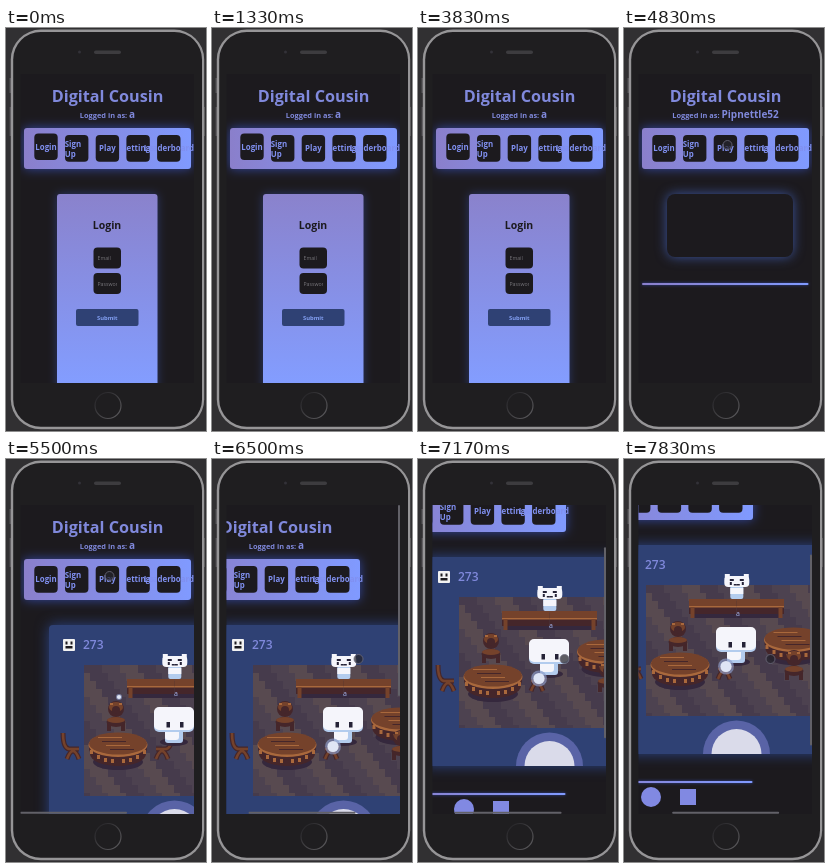
An HTML page with a canvas that plays this animation: 200x403 px, repeating every 8 s.

```html
<!DOCTYPE html>
<html lang="en">
<head>
<meta charset="utf-8">
<title>Phone demo</title>
<style>
html, body { margin: 0; width: 100%; height: 100%; overflow: hidden; background: #313032; }
canvas { display: block; width: 200px; height: 403px; }
</style>
</head>
<body>
<canvas id="stage" width="200" height="403"></canvas>
<script>
const c = document.getElementById('stage').getContext('2d');
const LOOP = 8000;
const FONT = '"Open Sans", "Noto Sans", sans-serif';
const DARK = '#1c1a1e', NAVY = '#2f4174', PURPLE = '#8a7fcb', BLUE = '#809aff', TEXT = '#8089dc';
const WOOD = '#75422b', WOOD_DARK = '#45262a', WOOD_LIGHT = '#a9683c';
const WHITE = '#f5f5fb', SHADE = '#b3ccee', INK = '#252237', SHADOW = '#35283d';

function box(x, y, w, h, r, fill, glow = 0, glowColor = '#3347a0') {
  c.save();
  c.shadowBlur = glow;
  c.shadowColor = glowColor;
  c.fillStyle = fill;
  c.beginPath();
  c.roundRect(x, y, w, h, r);
  c.fill();
  c.restore();
}

function disc(x, y, rx, fill, ry = rx) {
  c.fillStyle = fill;
  c.beginPath();
  c.ellipse(x, y, rx, ry, 0, 0, 7);
  c.fill();
}

function text(s, x, y, size, fill = TEXT, align = 'center', weight = 700) {
  c.font = `${weight} ${size}px ${FONT}`;
  c.textAlign = align;
  c.fillStyle = fill;
  c.fillText(s, x, y);
}

function blend(x0, y0, x1, y1, from = PURPLE, to = BLUE) {
  const g = c.createLinearGradient(x0, y0, x1, y1);
  g.addColorStop(0, from);
  g.addColorStop(1, to);
  return g;
}

// A block and its mirror image, both dx away from the axis
function pair(dx, y, w, h, fill) {
  c.fillStyle = fill;
  c.fillRect(dx, y, w, h);
  c.fillRect(-dx - w, y, w, h);
}

function at(x, y, paint, flip = 1) {
  c.save();
  c.translate(x, y);
  c.scale(flip, 1);
  paint();
  c.restore();
}

function clipped(x, y, w, h, paint) {
  c.save();
  c.beginPath();
  c.rect(x, y, w, h);
  c.clip();
  paint();
  c.restore();
}

// Eased progress between two times
function ease(t, a, b) {
  const p = Math.min(1, Math.max(0, (t - a) / (b - a)));
  return p * p * (3 - 2 * p);
}

function phone() {
  c.fillStyle = '#313032';
  c.fillRect(0, 0, 200, 403);
  box(3.5, 50, 2, 15, 0, '#555456');
  at(101.3, 0, () => pair(95.7, 79, 2, 29, '#555456'));
  box(4.8, 1.6, 193.4, 399.6, 30, '#969597');
  box(7.2, 4, 188.8, 394.8, 27.6, '#1f1e20');
  box(88, 22.5, 27, 3.5, 2, '#3d3c3f');
  disc(73.5, 24, 1.5, '#333238');
  c.strokeStyle = blend(90, 366, 113, 390, '#242326', '#5c5b5e');
  c.lineWidth = 1.2;
  c.beginPath();
  c.arc(102, 377.5, 13, 0, 7);
  c.stroke();
}

function header(t, user) {
  text('Digital Cousin', 101.5, 74, 16.2);
  c.font = `700 7.4px ${FONT}`;
  const label = 'Logged in as: ', w = c.measureText(label).width;
  c.font = `700 10px ${FONT}`;
  const left = 101.5 - (w + c.measureText(user).width) / 2;
  text(label, left, 90, 7.4, TEXT, 'left');
  text(user, left + w, 90, 10, TEXT, 'left');

  box(18, 100, 167, 41, 3, blend(18, 0, 185, 0), 11);
  const lift = 1.6 * (1 - ease(t, 4330, 4670));
  const labels = ['Login', 'Sign Up', 'Play', 'Settings', 'Leaderboard'];
  labels.forEach((s, i) => box(28.3 + i * 30.7, 107 - (i ? 0 : lift), 23.4, 26.7, 4, DARK));
  labels.forEach((s, i) => {
    const x = 40 + i * 30.7, y = 123.2 - (i ? 0 : lift / 2);
    const words = s.split(' ');
    if (words.length == 1) text(s, x, y, 7.9, '#8090f0');
    else words.forEach((word, k) => text(word, x - 12, y - 4.5 + k * 10, 7.9, '#8090f0', 'left'));
  });
}

function loginForm() {
  box(51, 166, 100.5, 220, 3, blend(0, 166, 0, 355, '#8a82cc', '#839dff'), 10, '#2b3768');
  text('Login', 101, 200.5, 10.5, DARK);
  ['Email', 'Password'].forEach((s, i) => {
    const y = 219.5 + i * 25.5;
    box(87.5, y, 27.5, 21, 4, DARK);
    clipped(91, y, 20, 21, () => text(s, 91.5, y + 12.5, 5.2, '#77757a', 'left', 400));
  });
  box(70, 281, 62.5, 17, 2, NAVY);
  text('Submit', 101.3, 291.7, 5.8, '#84a0f4');
}

function rule(y) {
  box(18, y - 1, 166.5, 2, 1, blend(18, 0, 184, 0), 3);
}

function loadingPanel() {
  box(43, 166, 126, 63, 8, DARK, 12, '#3c549c');
  rule(256);
}

// Staggered planks stepping down to the right
function floor() {
  const tones = ['#463b4c', '#4d4250', '#584a50'];
  for (let row = 0; row < 17; row++)
    for (let col = -6; col < 11; col++) {
      c.fillStyle = tones[(col + 6) % 3];
      c.fillRect(78 + col * 18 + row * 6, 206 + row * 8, 18, 8);
    }
}

function roundTable() {
  disc(0, 31, 25, SHADOW, 8);
  disc(0, 23, 28, WOOD_DARK, 12);
  disc(0, 18, 29, WOOD_DARK, 12);
  disc(0, 14, 29.5, WOOD_LIGHT, 12);
  disc(0, 12.5, 29, WOOD, 11);
  for (let i = 0; i < 4; i++) {
    pair(4 + i * 7, 28 - i * i, 3, 4, WOOD_LIGHT);
    box(-20 + i * 4, 6 + i * 4, 24, 1, 0, i % 2 ? WOOD_DARK : WOOD_LIGHT);
  }
}

function sideChair() {
  c.lineJoin = 'round';
  for (const [width, tone] of [[5, WOOD_DARK], [2.5, WOOD]]) {
    c.strokeStyle = tone;
    c.lineWidth = width;
    c.beginPath();
    c.moveTo(2, 2);
    c.quadraticCurveTo(2, 17, 8, 18);
    c.lineTo(18, 18);
    c.moveTo(6, 28);
    c.quadraticCurveTo(12, 12, 18, 28);
    c.stroke();
  }
}

function frontChair() {
  pair(5, 20, 4, 9, WOOD_DARK);
  disc(0, 7, 8, WOOD_DARK);
  disc(0, 5, 7, WOOD, 5);
  disc(0, 8, 4, WOOD_DARK);
  disc(0, 20, 9.5, WOOD_DARK, 5);
  disc(0, 18, 9, WOOD, 3);
  pair(3, 1, 3, 2, WOOD_LIGHT);
}

function bench() {
  pair(0, 15, 44, 4, SHADOW);
  pair(0, 2, 47.5, 13, WOOD_DARK);
  pair(0, 0, 47.5, 8, WOOD);
  pair(0, 7, 47.5, 1.5, WOOD_LIGHT);
  pair(42, 8, 4, 11, WOOD);
}

function clerk() {
  box(-6.5, 10, 13, 15, 2, SHADE);
  box(-6.5, 14, 13, 6, 0, WHITE);
  box(-12.5, 2, 25, 11, 4, WHITE);
  pair(7, 0, 5, 5, WHITE);
  pair(3, 5, 4, 2, INK);
  pair(5, 8, 2, 3, INK);
  pair(0, 10, 3, 1.5, INK);
}

function player() {
  disc(0, 35, 14, SHADOW, 4);
  box(-9, 22, 18, 14, 3, SHADE);
  box(-9, 22, 14, 11, 3, WHITE);
  box(-20, 1, 40, 24, 5, SHADE);
  box(-20, 0, 40, 23, 5, WHITE);
  at(1, 0, () => pair(5, 15, 3.5, 5.5, INK));
}

function game(t) {
  box(43, 166, 251.5, 209, 4, NAVY, 14, '#2c4486');
  at(63, 180, () => {
    box(-6, 0, 12, 12, 1, '#f2f2f2');
    pair(1.5, 2.5, 2, 3, DARK);
    pair(0, 7, 3.5, 2.5, DARK);
  });
  text('273', 77, 190, 12, TEXT, 'left', 600);
  clipped(78, 206, 181, 131, floor);
  at(168.8, 195, clerk);
  at(168.5, 220, bench);
  at(110, 243, frontChair);
  at(112, 272, roundTable);
  at(225.5, 247, roundTable);
  at(55, 272, sideChair);
  at(168, 272, sideChair, -1);
  at(226, 272, frontChair);
  at(168, 248, player);
  text('a', 170, 237, 7, '#a5b6ee', 'center', 400);

  // The orb drifts down from the chair to the player
  const p = ease(t, 5500, 6300);
  const x = 113 + 45 * p, y = 238 + 49.5 * p, r = 3 + 5 * p;
  disc(x, y, r, '#8d9cc9aa');
  disc(x, y, r * 0.7, '#dfe5f5');

  clipped(43, 330, 252, 45, () => {
    disc(168.5, 375, 33.5, '#5963a6');
    disc(168.5, 375, 25, '#dadbea');
  });
  rule(403);
  disc(83, 418, 10, '#8189e2');
  box(112, 410, 16, 16, 0, '#8189e2');
}

function pointer(t) {
  if (t >= 2500 && t < 2670) box(197.5, 178, 2.5, 7, 1, '#b98562');
  if (t < 4500) return;
  const p = ease(t, 5600, 6200);
  disc(103.5 + 43 * p, 117 + 83 * p, 4.5, '#25232bbb');
  c.strokeStyle = '#6d6b7b';
  c.lineWidth = 0.8;
  c.stroke();
}

function draw(t) {
  const late = ease(t, 7250, 7800);
  const sx = 37 * ease(t, 5670, 6150) + 19 * late;
  const sy = 68 * ease(t, 6600, 7100) + 12 * late;
  const playing = t >= 5170;

  phone();
  clipped(14.5, 46, 173.5, 309, () => {
    c.fillStyle = DARK;
    c.fillRect(14, 46, 174, 309);
    at(-sx, -sy, () => {
      header(t, t >= 4330 && !playing ? 'Pipnettle52' : 'a');
      if (t < 4670) loginForm();
      else if (!playing) loadingPanel();
      else game(t);
    });
    if (playing) box(14 + sx * 0.61, 352.7, 107, 2, 1, '#626168');
    if (t > 6000) box(186, 46 + sy * 0.62, 2, 191, 1, '#626168');
  });
  pointer(t);
}

function tick(now) {
  draw(now % LOOP);
  requestAnimationFrame(tick);
}
requestAnimationFrame(tick);
</script>
</body>
</html>
```
